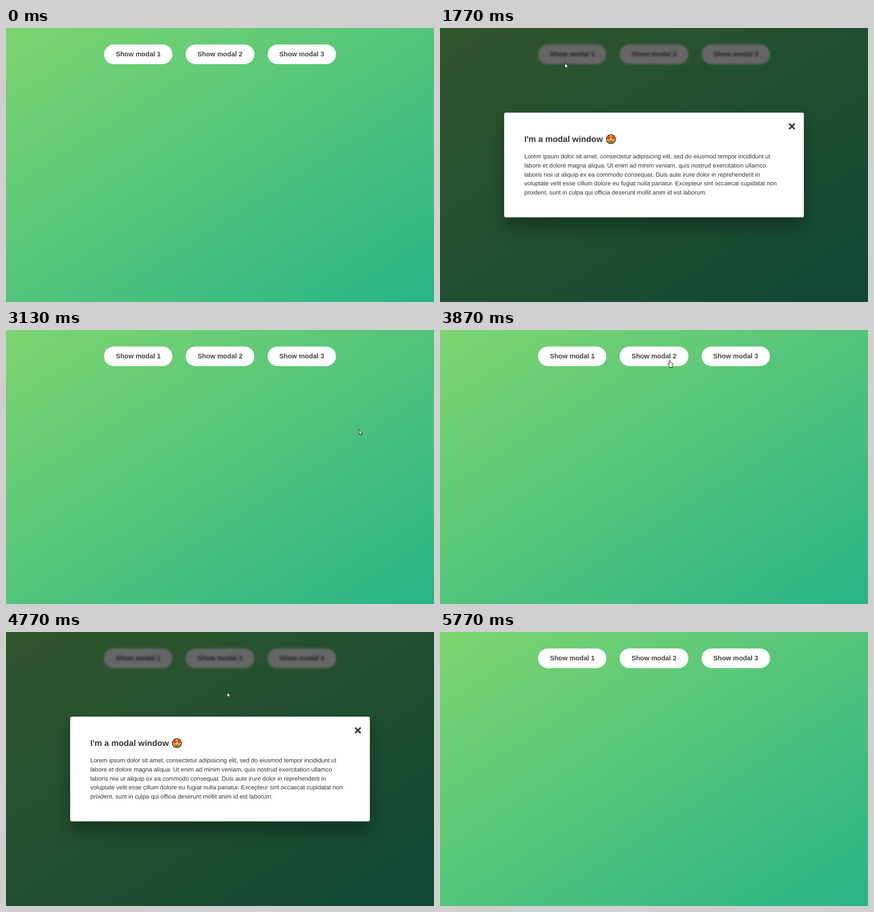
Write an HTML page that moves like this. It is 934x599 px and loops after 6.73 s.

```html
<!DOCTYPE html>
<html lang="en">
<head>
<meta charset="utf-8">
<title>Modal window</title>
<style>
  * { margin: 0; padding: 0; box-sizing: border-box; }

  html {
    font-size: 7.297px;
    --loop: 6730ms infinite;
  }

  html, body { width: 100%; height: 100%; overflow: hidden; }

  body {
    position: relative;
    display: flex;
    justify-content: center;
    align-items: flex-start;
    font-family: "Liberation Sans", Arial, sans-serif;
    line-height: 1.5;
    color: #333;
    background: linear-gradient(to top left, #28b487, #7dd56f);
    text-rendering: geometricPrecision;
    cursor: default;
  }

  svg { position: absolute; overflow: visible; }

  .show-modal {
    margin: 5rem 2rem;
    padding: 1.75rem 3.5rem;
    border: none;
    border-radius: 10rem;
    background: #fff;
    color: #444;
    font: 600 2rem/2.3rem "Liberation Sans", Arial, sans-serif;
    white-space: nowrap;
  }

  .overlay, .modal { visibility: hidden; animation: open var(--loop) step-end; }

  .overlay {
    position: absolute;
    inset: 0;
    background: rgba(0, 0, 0, .6);
    backdrop-filter: blur(.3rem);
  }

  .modal {
    position: absolute;
    top: 50%;
    left: 15%;
    width: 70%;
    height: 31.25rem;
    margin-top: -15.625rem;
    padding: 6rem;
    border-radius: .5rem;
    background: #fff;
    box-shadow: 0 3rem 5rem rgba(0, 0, 0, .3);
    white-space: nowrap;
  }

  .modal h1 { font-size: 2.5rem; margin-bottom: 2rem; }
  .modal p { font-size: 1.8rem; }
  .close { left: 621.3px; top: 22.9px; width: 14px; height: 14px; }
  .emoji { left: 221.7px; top: 46.3px; width: 22px; height: 22px; }

  .cursor {
    position: absolute;
    left: 0;
    top: 0;
    visibility: hidden;
    animation: move var(--loop), present var(--loop) step-end;
  }
  .cursor path { fill: #fff; stroke: #000; stroke-linejoin: round; }
  .arrow { opacity: 1; animation: point var(--loop) step-end; }
  .hand { left: -5.5px; top: -.5px; opacity: 0; animation: hover var(--loop) step-end; }

  @keyframes open {
    0%, 46.508%, 76.225% { visibility: hidden; }
    26.3%, 60.921% { visibility: visible; }
  }

  @keyframes present {
    0%, 85.735% { visibility: hidden; }
    11.886% { visibility: visible; }
  }

  @keyframes point {
    0%, 25.705%, 46.508%, 60.921% { opacity: 1; }
    22.288%, 40.564%, 55.2% { opacity: 0; }
  }

  @keyframes hover {
    0%, 25.705%, 46.508%, 60.921% { opacity: 0; }
    22.288%, 40.564%, 55.2% { opacity: 1; }
  }

  @keyframes move {
    0%, 11.886% { translate: 0 183px; animation-timing-function: cubic-bezier(.25, .5, .55, 1); }
    22.73% { translate: 272px 76px; animation-timing-function: linear; }
    29.87% { translate: 272px 76px; animation-timing-function: cubic-bezier(.4, .1, .4, 1); }
    40.11% { translate: 754px 214px; animation-timing-function: ease-out; }
    43.53% { translate: 770px 217px; animation-timing-function: linear; }
    49.78% { translate: 770px 217px; animation-timing-function: cubic-bezier(.4, .1, .4, 1); }
    57.5% { translate: 501px 66px; animation-timing-function: linear; }
    64.04% { translate: 500px 66px; animation-timing-function: cubic-bezier(.4, .1, .4, 1); }
    70.87% { translate: 482px 131px; animation-timing-function: linear; }
    79.94% { translate: 482px 131px; animation-timing-function: cubic-bezier(.5, .1, .8, .75); }
    83% { translate: 270px 127px; animation-timing-function: linear; }
    85.735%, 100% { translate: -25px 140px; }
  }
</style>
</head>
<body>
  <button class="show-modal">Show modal 1</button>
  <button class="show-modal">Show modal 2</button>
  <button class="show-modal">Show modal 3</button>

  <div class="overlay"></div>

  <div class="modal">
    <svg class="close" viewBox="0 0 14 14">
      <path d="M1 1 13 13M13 1 1 13" stroke="#333" stroke-width="3.2"/>
    </svg>
    <h1>I'm a modal window</h1>
    <svg class="emoji" viewBox="-11 -11 22 22">
      <defs>
        <path id="heart" d="M0 4.2C-2.4 2.5-4.3 .8-4.3-1.4-4.3-4-1.2-4.6 0-2.3 1.2-4.6 4.3-4 4.3-1.4 4.3 .8 2.4 2.5 0 4.2Z"/>
      </defs>
      <circle r="9.8" fill="#fbc53d" stroke="#1a1410" stroke-width="1.6"/>
      <g fill="#ee3a1f">
        <use href="#heart" transform="translate(-5 -3) rotate(-8)"/>
        <use href="#heart" transform="translate(5 -3) rotate(8)"/>
      </g>
      <path d="M-5.4 2.8H5.4C5 8.4-5 8.4-5.4 2.8Z" fill="#21160f"/>
      <path d="M-4 3.6H4L3.4 4.9H-3.4Z" fill="#fff"/>
    </svg>
    <p>Lorem ipsum dolor sit amet, consectetur adipisicing elit, sed do eiusmod tempor incididunt ut<br>
      labore et dolore magna aliqua. Ut enim ad minim veniam, quis nostrud exercitation ullamco<br>
      laboris nisi ut aliquip ex ea commodo consequat. Duis aute irure dolor in reprehenderit in<br>
      voluptate velit esse cillum dolore eu fugiat nulla pariatur. Excepteur sint occaecat cupidatat non<br>
      proident, sunt in culpa qui officia deserunt mollit anim id est laborum.</p>
  </div>

  <div class="cursor">
    <svg class="arrow" width="10" height="15">
      <path d="M.5 .9V11.6L3 9.3 4.8 13.5 6.6 12.7 4.9 8.7H8.4Z" stroke-width=".9"/>
    </svg>
    <svg class="hand" width="13" height="16">
      <path d="M4 9.5V1.7Q4 .5 5.1 .5T6.2 1.7V5.5Q6.4 4.7 7.4 4.9T8.4 5.8Q8.7 5.1 9.5 5.4T10.4 6.4Q10.8 5.8 11.5 6.2T12.2 7.5V10.5Q12.2 12 11 13.5V15.5H4.8V14Q3.5 12 .9 9.3 .2 8 1.3 7.6 2.3 7.4 4 9.5Z" stroke-width=".9"/>
    </svg>
  </div>
</body>
</html>
```
